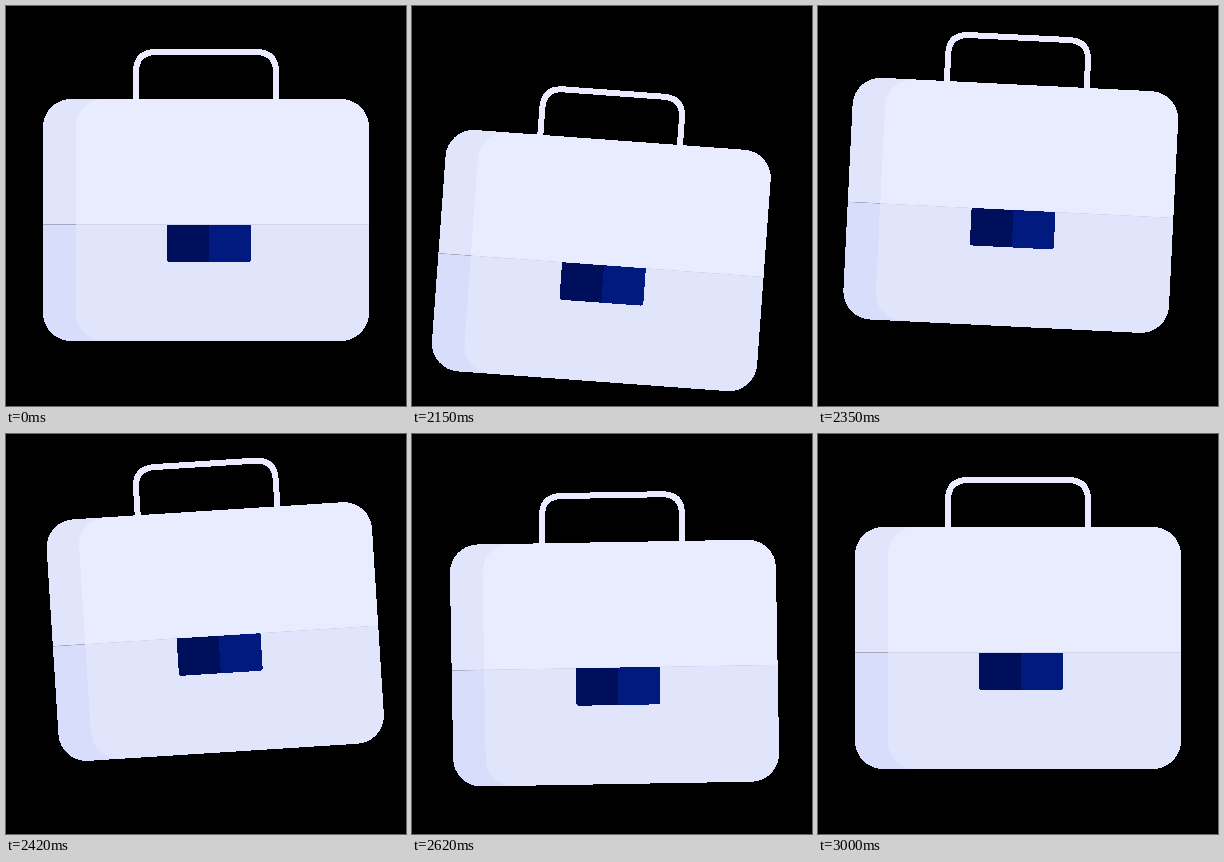
An HTML page that plays this animation: 400 by 400 pixels, repeating every 3.02 s.

```html
<!DOCTYPE html>
<html lang="en">
<head>
<meta charset="utf-8">
<title>Swinging briefcase</title>
<style>
  html, body { margin: 0; width: 100%; height: 100%; overflow: hidden; background: #000; }
  svg { display: block; width: 100%; height: 100%; }
</style>
</head>
<body>
<svg viewBox="0 0 400 400" shape-rendering="crispEdges">
  <defs>
    <clipPath id="upper"><rect x="30" y="90" width="340" height="128.5"/></clipPath>
    <clipPath id="lower"><rect x="30" y="218.5" width="340" height="125"/></clipPath>
    <g id="side"><rect x="37" y="93" width="326" height="242" rx="28"/></g>
    <g id="front"><rect x="69.5" y="93" width="293.5" height="242" rx="28"/></g>
  </defs>
  <g id="bag">
    <path d="M130 94V66Q130 46 150 46H250Q270 46 270 66V94" fill="none" stroke="#ebebff" stroke-width="6"/>
    <g clip-path="url(#upper)">
      <use href="#side" fill="#e0e5fc"/>
      <use href="#front" fill="#e9ecff"/>
    </g>
    <g clip-path="url(#lower)">
      <use href="#side" fill="#d9ddfc"/>
      <use href="#front" fill="#e0e5fc"/>
    </g>
    <path d="M161 218.5H203V256H164Q161 256 161 253Z" fill="#000f5c"/>
    <path d="M203 218.5H245V253Q245 256 242 256H203Z" fill="#001a80"/>
  </g>
</svg>
<script>
  const LOOP = 3020, REST = 2000, STEP = 25, SWING = 1000;
  const PIVOT = { x: 200, y: 68 };

  // [progress, value] keys, eased between neighbours
  const ANGLE = [[0, 0], [0.265, 7], [0.5, -7], [0.75, 5], [1, 0]];
  const DROP = [[0, 0], [0.13, 42], [0.388, -18], [0.65, 16], [0.9, 0], [1, 0]];

  const bag = document.getElementById('bag');
  const smooth = x => x * x * (3 - 2 * x);

  function valueAt(keys, u) {
    const next = keys.findIndex(([at]) => at >= u);
    if (next <= 0) return keys[0][1];
    const [[t0, v0], [t1, v1]] = [keys[next - 1], keys[next]];
    return v0 + (v1 - v0) * smooth((u - t0) / (t1 - t0));
  }

  // 40 poses per second, with changes on whole hundredths of a second
  function progress(time) {
    const hundredths = Math.floor((time - REST) / 10);
    const pose = Math.floor((hundredths * 10 + 9) / STEP);
    return Math.min(1, Math.max(0, pose * STEP / SWING));
  }

  function draw(time) {
    const u = progress(time);
    const angle = valueAt(ANGLE, u), drop = valueAt(DROP, u);
    bag.setAttribute('transform',
      `translate(0 ${drop.toFixed(3)}) rotate(${angle.toFixed(3)} ${PIVOT.x} ${PIVOT.y})`);
  }

  const start = performance.now();
  function tick() {
    draw((performance.now() - start) % LOOP);
    requestAnimationFrame(tick);
  }
  tick();
</script>
</body>
</html>
```
